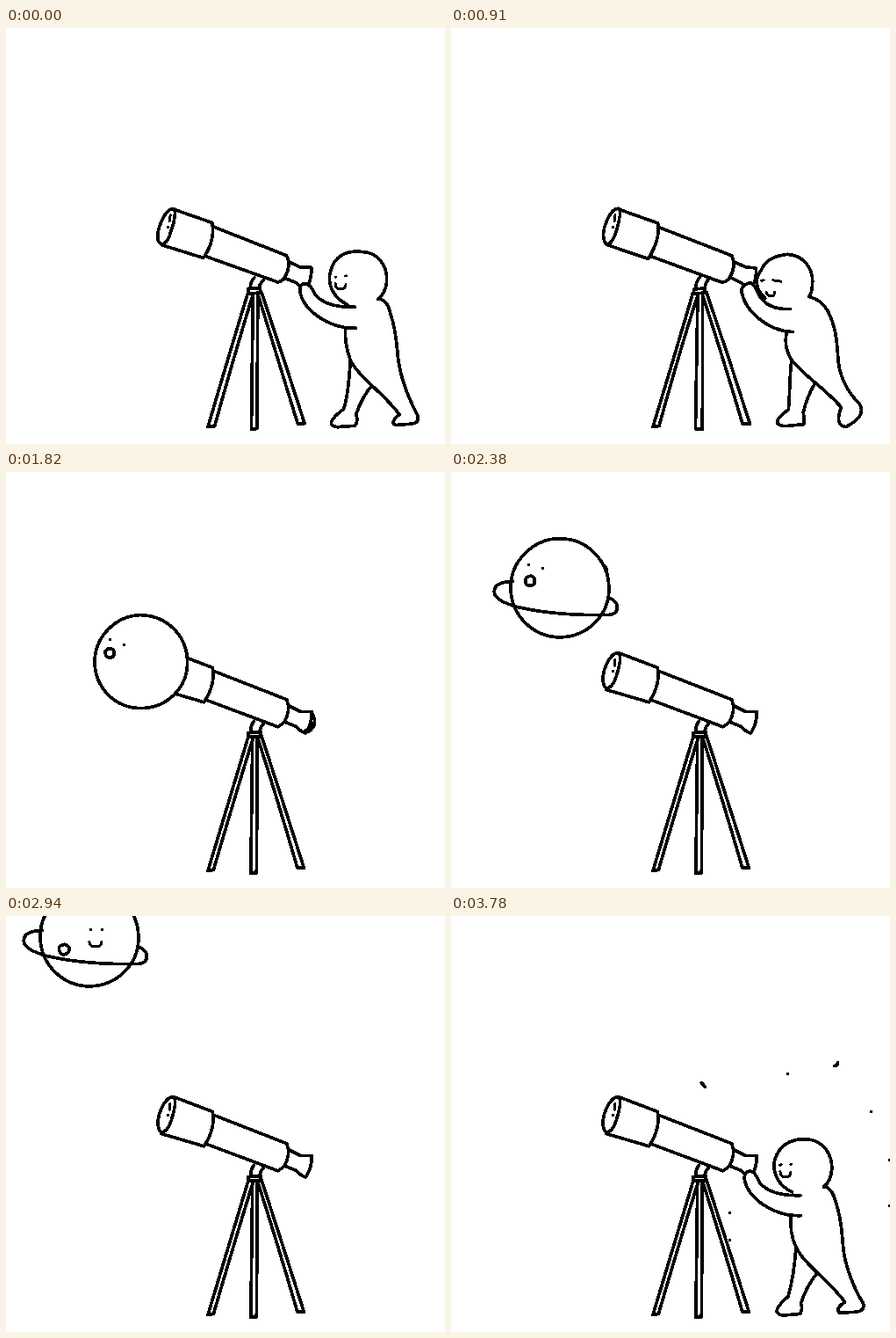
An HTML page for the animation above (3850 ms loop, 500x473 px).

```html
<!DOCTYPE html>
<html lang="en">
<head>
<meta charset="utf-8">
<title>Telescope</title>
<style>
  html, body { margin: 0; width: 100%; height: 100%; overflow: hidden; background: #fff; }
  svg { display: block; width: 500px; height: 473px; }
  path {
    stroke: #000; stroke-width: 3.7; stroke-linecap: round; stroke-linejoin: round;
    shape-rendering: crispEdges;
  }
  .fine { stroke-width: 3; }
  .dot { stroke: none; }
</style>
</head>
<body>
<svg id="stage" viewBox="0 0 500 473"></svg>
<script>
const STEP = 70, STEPS = 55;
const stage = document.getElementById('stage');

// Each body part in three poses: standing, leaning, dangling.
const BACK = [
  'M424 308 Q434 308 438 325 C445 345 445 360 447 375 C449 400 460 425 469 440 Q472 449 462 450 L443 451 Q437 447 448 439 C430 415 400 395 392 376 Q386 360 387 341',
  'M408 305 Q422 309 429 322 C438 340 440 355 441 372 C442 395 452 414 466 428 Q471 438 460 448 L450 454 Q437 452 444 432 C430 412 395 390 387 376 Q379 360 382 345',
  'M347 272 Q370 273 385 279 C398 287 405 305 411 322 C418 340 425 358 431 377 Q435 384 421 392 L412 398 Q401 397 409 385 C404 370 397 357 390 353 Q370 338 360 326'
];
const LEG = [
  'M393 376 C391 400 389 418 384 433 Q369 445 371 451 Q374 455 381 454 L397 452 Q401 446 399 440 Q405 420 418 405',
  'M388 378 C386 400 386 420 384 434 Q370 444 372 450 Q376 453 384 452 L402 451 Q403 444 401 437 Q405 420 414 405',
  'M371 339 C375 355 377 368 378 382 Q371 391 374 396 Q380 399 385 397 L390 394 Q392 390 392 383 Q398 372 396 361'
];
const ARM = [
  'M398 341 C370 342 338 322 334 298 Q334 291 340 290 Q346 290 352 303 Q366 318 398 317',
  'M389 345 C360 344 334 322 331 298 Q333 290 341 290 Q346 292 352 305 Q362 321 386 319',
  'M353 283 C363 297 363 310 361 320 Q348 331 335 327 Q324 323 325 314 Q332 303 349 303'
];
const HEAD = [
  'M389 314 C370 306 366 288 369 277 C374 260 388 253 404 254 C424 254 435 272 434 288 Q433 302 424 308',
  'M358 307 C347 298 346 285 353 275 C360 262 372 258 384 258 C402 259 412 274 412 288 Q412 300 408 305'
];
const EYES = ['M375 283 L376 283 M387 282 L388 282', 'M353 287 L356 287 M367 287 L376 288'];
const SMILE = ['M375 290 Q375 297 381 297 Q387 297 387 291', 'M359 300 Q360 305 364 305 Q369 305 369 300'];

const CIRCLE = 'M0 -1 C.55 -1 1 -.55 1 0 C1 .55 .55 1 0 1 C-.55 1 -1 .55 -1 0 C-1 -.55 -.55 -1 0 -1 Z';
const OVAL = 'M.22 -1.1 C.66 -1.1 .92 -.6 .8 0 C.68 .6 .22 1.1 -.22 1.1 C-.66 1.1 -.92 .6 -.8 0 C-.68 -.6 -.22 -1.1 .22 -1.1 Z';
const RING = 'M-54 -7 Q-75 -7 -75 4 Q-75 14 -49 21 Q-4 31 54 31 Q66 30 65 20 Q63 13 55 11';

// time, x, y, radius
const FLIGHT = [
  [1330, 183, 226, 8], [1470, 171, 220, 28], [1680, 156, 217, 48], [1820, 154, 216, 53],
  [1960, 152, 214, 55], [2240, 131, 160, 56], [2380, 124, 132, 56], [2800, 110, 51, 56],
  [2940, 95, 24, 56], [3220, 83, -30, 56], [3360, 78, -62, 56]
];
// time, mouth, left eye, right eye
const LOOK = [
  [1470, -10, 5, -10, -10, -1, -7], [1820, -36, -10, -36, -26, -20, -20],
  [2380, -34, -8, -36, -27, -20, -23], [2520, -34, -8, -36, -27, -20, -23],
  [2870, -29, 14, 1, -9, 14, -9]
];
const SPARKS = [[285, 189], [383, 179], [440, 168], [478, 222], [499, 277], [499, 329], [317, 337], [317, 368]];

const NUM = /-?[\d.]+/g;
let seed = 1, out = '';

function random() {
  seed = (seed * 16807) % 2147483647;
  return seed / 2147483647;
}

function remap(d, fn) {
  let i = 0;
  return d.replace(NUM, v => fn(+v, i++).toFixed(2));
}

function mix(a, b, k) {
  const to = b.match(NUM);
  return remap(a, (v, i) => v + (to[i] - v) * k);
}

const place = (d, x, y, s = 1) => remap(d, (v, i) => v * s + (i % 2 ? y : x));
const ease = (t, from, to) => Math.min(1, Math.max(0, (t - from) / (to - from)));

function track(keys, t) {
  let i = 1;
  while (i < keys.length - 1 && keys[i][0] < t) i++;
  const a = keys[i - 1], b = keys[i], k = ease(t, a[0], b[0]);
  return a.slice(1).map((v, j) => v + (b[j + 1] - v) * k);
}

function draw(d, fill = 'none', wobble = 1.4, kind = '') {
  const shaky = remap(d, v => v + (random() - .5) * wobble);
  out += `<path d="${shaky}" fill="${fill}" class="${kind}"/>`;
}

const detail = d => draw(d, 'none', .4, 'fine');

function dot(x, y) {
  const l = Math.round(x) - 1, u = Math.round(y) - 1;
  out += `<path d="M${l} ${u}h3v3h-3z" class="dot"/>`;
}

function telescope() {
  draw('M276 302 Q258 360 230 453 L237 453 Q262 365 281 303', '#fff');
  draw('M286 301 Q308 370 332 450 L340 450 Q316 375 291 301', '#fff');
  draw('M281 303 L279 456 L286 456 L287 303', '#fff');
  draw('M283 284 Q278 289 279 297 M294 286 Q288 291 289 297');
  draw('M276 297 L290 296 L290 301 L276 302 Z', '#fff');
  draw('M321 265 L336 272 L348 273 Q349 286 341 297 Q334 294 331 290 L318 284', '#fff');
  draw('M234 226 L320 259 Q325 270 317 284 Q314 288 309 289 L228 260', '#fff');
  draw('M191 206 L235 222 Q239 240 225 262 L177 247', '#fff');
  draw('M191 206 C182 203 170 230 174 242 C177 250 184 245 188 232 C192 220 194 208 191 206 Z', '#fff');
  detail('M187 213 L186 220');
  dot(184, 226);
}

function person(t) {
  const lean = ease(t, 420, 770), lift = ease(t, 1190, 1470);
  const shrink = track([[1470, 0], [1680, .7], [1750, .95]], t)[0];
  const suck = (d, k) => remap(d, (v, i) => v + ((i % 2 ? 284 : 343) - v) * k);
  const pose = p => suck(lift ? mix(p[1], p[2], lift) : mix(p[0], p[1], lean), shrink);
  const face = p => suck(mix(p[0], p[1], lean), lift);

  draw(pose(LEG), '#fff');
  draw(pose(BACK), '#fff');
  if (lift < 1) {
    draw(face(HEAD), '#fff');
    detail(face(EYES));
    detail(face(SMILE));
  }
  draw(pose(ARM), '#fff');
}

function planet(t) {
  const [x, y, r] = track(FLIGHT, t);
  const [mx, my, ax, ay, bx, by] = track(LOOK, t);
  draw(place(mix(OVAL, CIRCLE, ease(t, 1470, 1750)), x, y, r), '#fff');
  if (t >= 2030) draw(place(RING, x, y, .8 + .2 * ease(t, 1960, 2170)));
  if (t >= 2170 && t < 2590) draw(place('M51 -26 Q54 -22 53 -16', x, y));
  if (t < 1400) return;
  draw(place(CIRCLE, x + mx, y + my, 5.5), '#fff');
  dot(x + ax, y + ay);
  dot(x + bx, y + by);
  if (t >= 2660) detail(place('M0 5 Q0 11 7 11 Q14 11 14 5', x, y));
}

function fall(t) {
  const k = (t - 3430) / STEP;
  draw(place('M0 0 L45 45', 88 + k * 140, 2 + k * 140));
}

function burst(t) {
  const k = .4 + .6 * ease(t, 3570, 3780);
  SPARKS.forEach(([px, py], i) => {
    const x = 402 + (px - 402) * k, y = 283 + (py - 283) * k;
    if (i === 0) draw(place('M0 0 L5 5', x, y));
    else if (i === 2) draw(place('M1 -2 Q0 2 -3 2', x, y));
    else dot(x, y);
  });
}

function render(step) {
  const t = step * STEP;
  seed = 977 + (step % 4) * 7919;
  out = '';
  telescope();
  if (t < 1750) person(t);
  else if (t < 1960) draw('M348 273 Q354 285 350 291 Q345 298 340 294 Q348 291 349 286', '#fff');
  if (t >= 1330 && t <= 3360) planet(t);
  if (t >= 3430 && t < 3570) fall(t);
  if (t >= 3570) {
    person(0);
    burst(t);
  }
  stage.innerHTML = out;
}

let shown = -1;
function tick() {
  const step = Math.floor(performance.now() / STEP) % STEPS;
  if (step !== shown) render(shown = step);
  requestAnimationFrame(tick);
}
tick();
</script>
</body>
</html>
```
